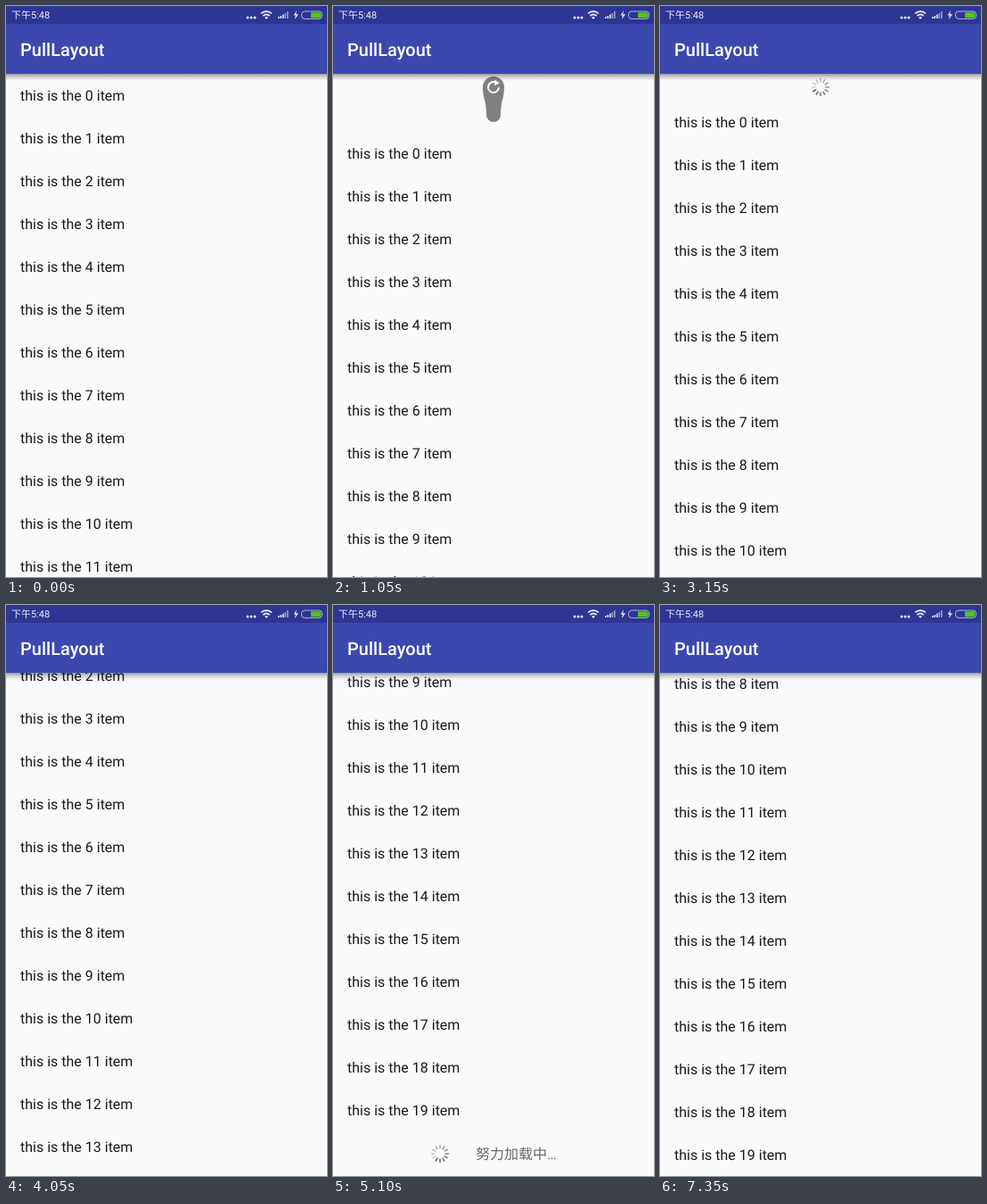
An HTML page for the animation above (7.5 s loop, 360 by 640 pixels).

```html
<!DOCTYPE html>
<html lang="zh">
<head>
<meta charset="utf-8">
<title>PullLayout</title>
<style>
  html, body { margin: 0; width: 100%; height: 100%; overflow: hidden; background: #fafafa; }
  svg { display: block; width: 360px; height: 640px; }
  text {
    font-family: Roboto, "Noto Sans CJK SC", "Noto Sans CJK JP", "Noto Sans CJK", sans-serif;
    text-rendering: geometricPrecision;
    white-space: pre;
  }
  .item { font-size: 16px; fill: #1a1a1a; }
  .hint { font-size: 16px; fill: #686868; }
  .title { font-size: 20px; font-weight: 500; fill: #fff; }
  .clock { font-size: 11px; fill: #eceef8; }
</style>
</head>
<body>
<svg viewBox="0 0 360 640">
  <defs>
    <linearGradient id="shade" x2="0" y2="1">
      <stop offset="0" stop-color="#000" stop-opacity=".38"/>
      <stop offset=".45" stop-color="#000" stop-opacity=".16"/>
      <stop offset="1" stop-color="#000" stop-opacity="0"/>
    </linearGradient>
  </defs>
  <rect width="360" height="640" fill="#fafafa"/>

  <g id="list"></g>

  <g id="drop">
    <path id="blob" fill="#808080"/>
    <g id="arrow">
      <path d="M2.6-5.4A6 6 0 1 0 6 .4" fill="none" stroke="#fff" stroke-width="2"/>
      <path d="M1.2-8.6L6.8-4.6L1-1.8Z" fill="#fff"/>
    </g>
  </g>
  <g id="refreshing"></g>

  <g id="pull">
    <path d="M133 10V-8M129.6-4.6L133-8.6L136.4-4.6" fill="none" stroke="#111" stroke-width="2"/>
    <text class="hint" x="173" y="6">上拉加载</text>
  </g>
  <g id="loading">
    <g id="loadSpin"></g>
    <text class="hint" x="160" y="6">努力加载中…</text>
  </g>

  <rect y="76" width="360" height="8" fill="url(#shade)"/>
  <rect width="360" height="76" fill="#3b48ae"/>
  <rect width="360" height="20" fill="#2d3693"/>
  <text class="title" x="16" y="56">PullLayout</text>

  <text class="clock" x="6" y="14">下午5:48</text>
  <g fill="#e4e6f4">
    <circle cx="271" cy="13" r="1.5"/><circle cx="275" cy="13" r="1.5"/><circle cx="279" cy="13" r="1.5"/>
    <path d="M292 15L290 12.8Q292 11.4 294 12.8Z"/>
    <path d="M305 12h1.6v2h-1.6zM307.5 11h1.6v3h-1.6zM310 9.5h1.6v4.5h-1.6z"/>
    <path d="M312.5 8h1.6v6h-1.6zM315 6h1.6v8h-1.6z" opacity=".6"/>
    <path d="M326 5L322.6 10.6H324.8L323.8 15L328 9.2H325.2Z"/>
  </g>
  <g fill="none" stroke="#e4e6f4">
    <path d="M286 8.4Q292 3.6 298 8.4M288.3 11Q292 8 295.7 11" stroke-width="1.7"/>
    <rect x="331.5" y="6" width="23" height="8.4" rx="3.4" opacity=".7"/>
  </g>
  <path d="M342 7.2H351.2Q353.4 7.2 353.4 9.4V11Q353.4 13.2 351.2 13.2H342Z" fill="#55c516"/>
</svg>

<script>
const LOOP = 7500, STEP = 150, TOP = 76, ROW = 48, COUNT = 20, HEAD = 30, FOOT = 50;
const NS = "http://www.w3.org/2000/svg";
const $ = id => document.getElementById(id);

// Scroll position: [time, offset]
const KEYS = [
  [0, 0], [150, 3], [300, 9], [450, 18], [600, 29], [750, 41], [900, 53], [1050, 65],
  [1200, 72], [1350, 74], [1500, 50], [1650, 30], [3300, 30], [3450, 24], [3600, 0],
  [3900, 0], [4050, -117], [4200, -250], [4350, -380], [4500, -430], [4650, -463],
  [4800, -478], [4950, -474], [5100, -446], [7200, -446], [7350, -396], [7500, -396]
];

function make(parent, tag, attrs, text = "") {
  const el = document.createElementNS(NS, tag);
  for (const k in attrs) el.setAttribute(k, attrs[k]);
  el.textContent = text;
  return parent.appendChild(el);
}

function makeSpinner(parent) {
  for (let i = 0; i < 12; i++) {
    make(parent, "line", {
      y1: -5.4, y2: -10, stroke: "#555", "stroke-width": 1.5,
      opacity: 0.95 - i * 0.065, transform: `rotate(${-30 * i})`
    });
  }
}

function offsetAt(t) {
  const i = KEYS.findIndex(k => k[0] > t);
  const [t0, a] = KEYS[i - 1], [t1, b] = KEYS[i];
  return a + (b - a) * (t - t0) / (t1 - t0);
}

const move = (id, x, y, turn = 0) =>
  $(id).setAttribute("transform", `translate(${x} ${y}) rotate(${turn})`);
const show = (id, on) => $(id).setAttribute("display", on ? "inline" : "none");

// Round head with a tail that narrows as it stretches
function blob(cy, off) {
  const pull = Math.max(0, off - HEAD), r = 12, s = r - pull * 4 / 35;
  const y = cy + r + pull * 27 / 35 - s, d = y - cy;
  return `M${180 - r} ${cy}A${r} ${r} 0 0 1 ${180 + r} ${cy}` +
    `C${180 + r} ${cy + d * 0.4} ${180 + s} ${cy + d * 0.5} ${180 + s} ${y}` +
    `A${s} ${s} 0 0 1 ${180 - s} ${y}` +
    `C${180 - s} ${cy + d * 0.5} ${180 - r} ${cy + d * 0.4} ${180 - r} ${cy}Z`;
}

function draw(t) {
  const off = offsetAt(t);
  const head = TOP + Math.min(off, HEAD) - HEAD / 2;
  const foot = TOP + COUNT * ROW + off + FOOT / 2;
  const turn = Math.floor(t / 100 + 1) * 30;

  move("list", 0, TOP + off);

  show("drop", t < 1500);
  $("blob").setAttribute("d", blob(head, off));
  move("arrow", 180, head);

  show("refreshing", t >= 1500 && t < 3600);
  move("refreshing", 180, head, turn);

  show("pull", t >= 3900 && t < 5100);
  move("pull", 0, foot);
  show("loading", t >= 5100);
  move("loading", 0, foot);
  move("loadSpin", 120, 0, turn + 90);
}

for (let i = 0; i < COUNT; i++) {
  make($("list"), "text", { class: "item", x: 16, y: i * ROW + 30 }, `this is the ${i} item`);
}
makeSpinner($("refreshing"));
makeSpinner($("loadSpin"));

const start = performance.now();
function tick(now) {
  const t = Math.max(0, now - start) % LOOP;
  draw(Math.floor(t / STEP) * STEP);
  requestAnimationFrame(tick);
}
draw(0);
requestAnimationFrame(tick);
</script>
</body>
</html>
```
